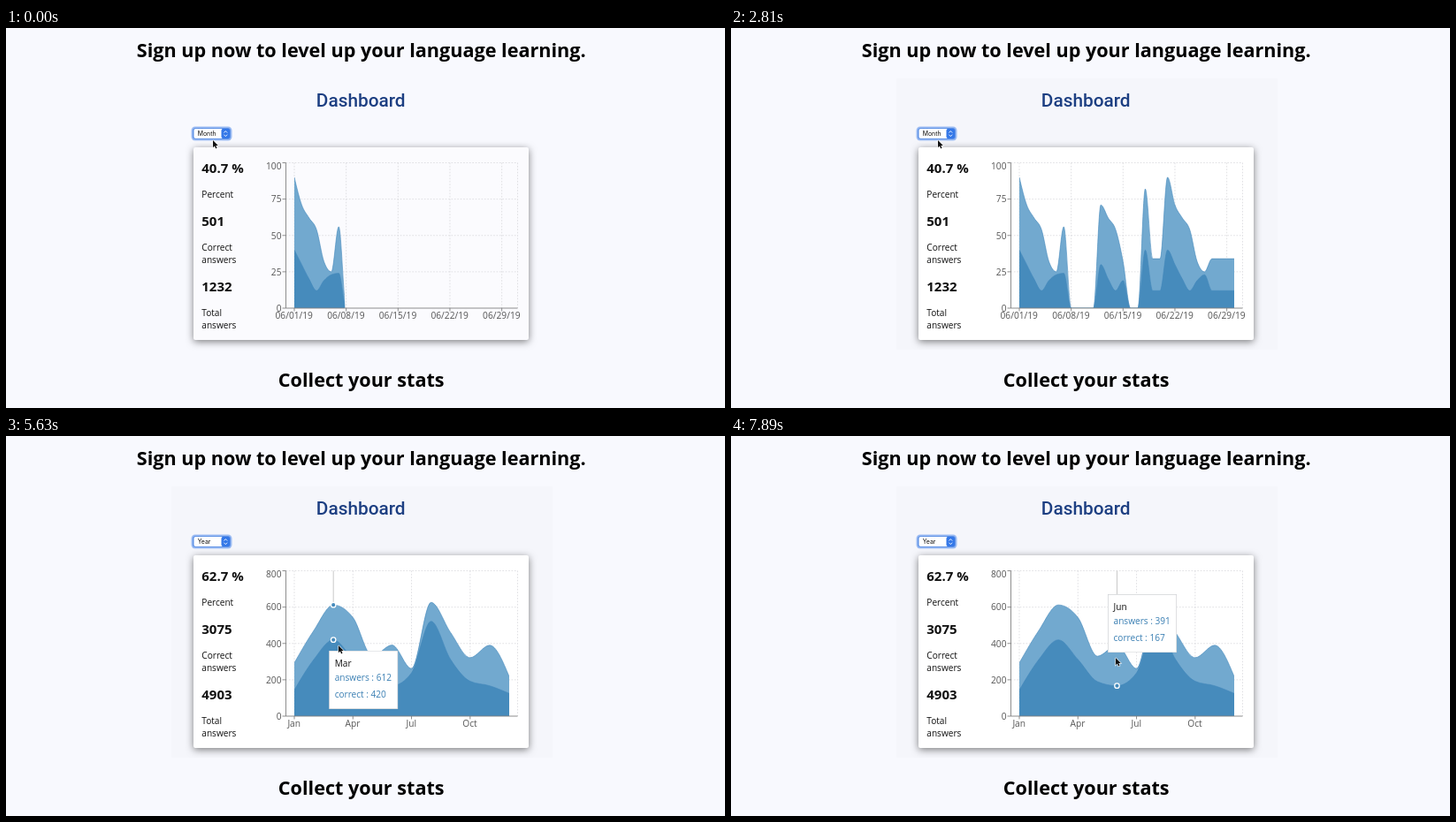
Recreate the animation shown at these times as an HTML page with a canvas. Size 813 by 430 pixels, loop 8000 ms.

```html
<!DOCTYPE html>
<html lang="en">
<head>
<meta charset="utf-8">
<title>Dashboard</title>
<style>
  html, body { margin: 0; width: 100%; height: 100%; overflow: hidden; background: #f8f9fe; }
  canvas { display: block; }
</style>
</head>
<body>
<canvas id="stage" width="813" height="430" aria-label="Statistics dashboard"></canvas>
<script>
const ctx = document.getElementById('stage').getContext('2d');
const LOOP = 8000, STEPS = 61, STEP = LOOP / STEPS;
const SANS = '"Open Sans", "Noto Sans", sans-serif';
const UI = 'Inter, "Liberation Sans", sans-serif';
const PLOT = { left: 316.5, right: 578.5, top: 152.5, bottom: 317, x0: 326, x1: 569 };
const TIP = { w: 78, h: 66, gap: 6, lag: 400 };
const LIGHT = '#72a9cf', DARK = '#468bbc', LINE = '#4287ba';
const GRID = '#dadade', AXIS = '#808080';

const MENU_OPEN = 1560, MENU_YEAR = 1830, MENU_FADE = 2610, MENU_SHUT = 2740, YEAR_ON = 2880;

// The month is built from one repeating week.
const week = [90, 71, 62, 54, 32, 25], weekCorrect = [40, 30, 20, 12, 19, 23];
const repeat = (n, v) => Array(n).fill(v);
const fillMonth = (w, last, peak, flat) => [...w, last, ...repeat(4, 0), ...w.slice(1, 5),
  0, 0, peak, flat, flat, ...w, ...repeat(4, flat)];

const month = {
  name: 'Month', right: 501, total: 1232, max: 100, start: -260, every: 7,
  ticks: [1, 8, 15, 22, 29].map(d => `06/${String(d).padStart(2, '0')}/19`),
  answers: fillMonth(week, 56, 82, 34),
  correct: fillMonth(weekCorrect, 24, 40, 12)
};
const year = {
  name: 'Year', right: 3075, total: 4903, max: 800, start: 2945, every: 3,
  ticks: ['Jan', 'Apr', 'Jul', 'Oct'],
  answers: [293, 472, 612, 543, 330, 391, 262, 626, 460, 322, 390, 218],
  correct: [143, 312, 420, 312, 190, 167, 238, 522, 312, 192, 167, 125]
};
const MONTHS = ['Jan', 'Feb', 'Mar', 'Apr', 'May', 'Jun'];

// Pointer stops: time, x, y
const PATH = [[0, 234, 127], [360, 234, 119], [1700, 234, 119], [2200, 234, 127],
  [3050, 234, 127], [3803, 315, 229], [5380, 352, 237], [5640, 376, 237],
  [6950, 392, 244], [7082, 405, 244], [7600, 413, 250], [7870, 435, 251]];

const clamp = v => Math.max(0, Math.min(1, v));
const mix = (a, b, p) => a + (b - a) * p;

// The picture refreshes in even steps.
const snap = t => Math.min(STEPS - 1, Math.floor((t + 30) / STEP)) * STEP;

function pointer(t) {
  const next = PATH.findIndex(k => k[0] > t);
  const i = next < 0 ? PATH.length - 1 : Math.max(1, next);
  const a = PATH[i - 1], b = PATH[i], p = clamp((t - a[0]) / (b[0] - a[0]));
  return { x: mix(a[1], b[1], p), y: mix(a[2], b[2], p) };
}

// The tooltip sits below the pointer, or above it when there is no room.
function tipGoal(t) {
  const { x, y } = pointer(t);
  const flip = y > 247;
  return { x: Math.max(x, PLOT.left) + TIP.gap, y: flip ? y - TIP.h - TIP.gap + 1 : y + TIP.gap };
}

// It trails behind its goal: the mean of the recent goals.
function tipPlace(t) {
  const n = 16, sum = { x: 0, y: 0 };
  for (let i = 0; i < n; i++) {
    const goal = tipGoal(t - TIP.lag * (i + .5) / n);
    sum.x += goal.x / n;
    sum.y += goal.y / n;
  }
  return sum;
}

function activeMonth(t) {
  const { x } = pointer(t - 60);
  return x > PLOT.left ? Math.max(0, Math.round((x - PLOT.x0) / stepX(year))) : -1;
}

// cubic-bezier(.25, .1, .25, 1)
function ease(p) {
  const bez = (a, b, u) => 3 * a * u * (1 - u) ** 2 + 3 * b * u * u * (1 - u) + u ** 3;
  let lo = 0, hi = 1;
  for (let i = 0; i < 24; i++) {
    const mid = (lo + hi) / 2;
    if (bez(.25, .25, mid) < p) lo = mid; else hi = mid;
  }
  return bez(.1, 1, lo);
}

function text(str, x, y, size, color = '#111', opt = {}) {
  ctx.font = `${opt.weight || 400} ${size}px ${opt.font || SANS}`;
  ctx.textAlign = opt.align || 'left';
  ctx.fillStyle = color;
  ctx.fillText(str, x, y);
}

function box(x, y, w, h, r, fill) {
  ctx.beginPath();
  ctx.roundRect(x, y, w, h, r);
  ctx.fillStyle = fill;
  ctx.fill();
}

function stroke(points, color, width = 1, dash = []) {
  ctx.beginPath();
  points.forEach(([x, y]) => ctx.lineTo(x, y));
  ctx.strokeStyle = color;
  ctx.lineWidth = width;
  ctx.setLineDash(dash);
  ctx.stroke();
  ctx.setLineDash([]);
}

const stepX = data => (PLOT.x1 - PLOT.x0) / (data.answers.length - 1);
const toX = (data, i) => PLOT.x0 + i * stepX(data);
const toY = (data, v) => mix(PLOT.bottom, PLOT.top, v / data.max);

// Monotone cubic curve through evenly spaced values
function curve(data, values) {
  const h = stepX(data), ys = values.map(v => toY(data, v)), n = ys.length;
  const slope = ys.slice(1).map((y, i) => (y - ys[i]) / h);
  const tan = ys.map((_, i) => {
    if (i === 0 || i === n - 1) return 0;
    const a = slope[i - 1], b = slope[i];
    return (Math.sign(a) + Math.sign(b)) * Math.min(Math.abs(a), Math.abs(b), Math.abs(a + b) / 4);
  });
  tan[0] = (3 * slope[0] - tan[1]) / 2;
  tan[n - 1] = (3 * slope[n - 2] - tan[n - 2]) / 2;
  const path = new Path2D();
  path.moveTo(PLOT.x0, ys[0]);
  for (let i = 1; i < n; i++) {
    const x = toX(data, i);
    path.bezierCurveTo(x - h * 2 / 3, ys[i - 1] + tan[i - 1] * h / 3,
      x - h / 3, ys[i] - tan[i] * h / 3, x, ys[i]);
  }
  return path;
}

function area(data, values, fill) {
  const line = curve(data, values), shape = new Path2D(line);
  shape.lineTo(PLOT.x1, PLOT.bottom);
  shape.lineTo(PLOT.x0, PLOT.bottom);
  ctx.fillStyle = fill;
  ctx.fill(shape);
  ctx.strokeStyle = LINE;
  ctx.lineWidth = .6;
  ctx.stroke(line);
}

function drawPage(fade) {
  ctx.fillStyle = '#f8f9fe';
  ctx.fillRect(0, 0, 813, 430);
  ctx.globalAlpha = fade;
  box(187, 57, 431, 307, 0, '#f5f6fb');
  ctx.globalAlpha = 1;
  const title = { weight: 700, align: 'center' };
  text('Sign up now to level up your language learning.', 401.7, 33, 21.6, '#000', title);
  text('Collect your stats', 401.7, 406, 21.6, '#000', title);
  text('Dashboard', 401.2, 89, 20.8, '#1d3f82', { weight: 500, align: 'center', font: 'Roboto, sans-serif' });

  ctx.save();
  ctx.shadowColor = 'rgba(0,0,0,.5)';
  ctx.shadowBlur = 9;
  ctx.shadowOffsetY = 2;
  box(212, 135, 379, 218, 2, fade < .5 ? '#fbfbfe' : '#fff');
  ctx.restore();
}

function drawStats({ right, total }) {
  const percent = (100 * right / total).toFixed(1) + ' %';
  const rows = [[percent, 164, 'Percent'], [right, 224, 'Correct', 'answers'], [total, 298, 'Total', 'answers']];
  rows.forEach(([value, y, ...labels]) => {
    text(value, 221.3, y, 15, '#111', { weight: 700 });
    labels.forEach((s, i) => text(s, 221.3, y + 28 + i * 14, 10.1));
  });
}

function drawSelect(label) {
  box(209.5, 111.5, 46, 16, 4.5, '#9dbdf3');
  box(211, 113, 43, 13, 3.5, '#5f92e6');
  box(212.5, 114, 33, 11, 2, '#fff');
  box(243.5, 114, 9.5, 11, 2, '#3478e8');
  [-1, 1].forEach(d => {
    const y = 119.6 + d * 1.1;
    stroke([[246.4, y], [248.3, y + d * 1.9], [250.2, y]], '#fff', .9);
  });
  text(label, 216.7, 122.3, 6.9, '#111', { font: UI });
}

function drawMenu(row, alpha) {
  ctx.save();
  ctx.globalAlpha = alpha;
  ctx.shadowColor = 'rgba(0,0,0,.35)';
  ctx.shadowBlur = 5;
  ctx.shadowOffsetY = 1;
  box(205, 100, 49.5, 37, 3, '#666a72');
  ctx.shadowColor = 'transparent';
  box(205, 103.2 + row * 10.3, 49.5, 10.5, 0, '#3b7df0');
  ['Week', 'Month', 'Year'].forEach((s, i) =>
    text(s, 218.7, 110.7 + i * 10.3, 6.9, '#fff', { weight: 600, font: UI }));
  stroke([[209.3, 118.9], [211, 121], [214, 116]], '#fff', 1.1);
  ctx.restore();
}

function drawChart(data, t, active) {
  const { left, right, top, bottom, x0, x1 } = PLOT;
  const tickX = data.ticks.map((_, i) => toX(data, i * data.every));
  const rows = [0, 1, 2, 3, 4].map(i => mix(bottom, top, i / 4));

  rows.slice(1).forEach(y => stroke([[left, y], [right, y]], GRID, .8, [1.7, 1.7]));
  [...tickX, right].forEach(x => stroke([[x, top], [x, bottom]], GRID, .8, [1.7, 1.7]));
  if (active >= 0) stroke([[toX(data, active), top], [toX(data, active), bottom]], '#c8c8c8');

  const shown = ease(clamp((t - data.start) / 1500));
  ctx.save();
  ctx.beginPath();
  ctx.rect(x0, top, shown * (x1 - x0), bottom - top);
  ctx.clip();
  area(data, data.answers, LIGHT);
  area(data, data.correct, DARK);
  ctx.restore();

  stroke([[left, top], [left, bottom], [right, bottom]], AXIS, .9);
  rows.forEach((y, i) => {
    stroke([[left - 4, y], [left, y]], AXIS, .9);
    text(data.max / 4 * i, 311.5, y + (i === 4 ? 7 : 3.8), 10.2, '#555', { align: 'right' });
  });
  data.ticks.forEach((s, i) => {
    stroke([[tickX[i], bottom], [tickX[i], bottom + 3.5]], AXIS, .9);
    text(s, tickX[i] - .3, 328.7, 10.2, '#555', { align: 'center' });
  });

  if (active < 0) return;
  [data.answers, data.correct].forEach(values => {
    ctx.beginPath();
    ctx.arc(toX(data, active), toY(data, values[active]), 2.7, 0, 7);
    ctx.fillStyle = DARK;
    ctx.fill();
    ctx.strokeStyle = '#fff';
    ctx.lineWidth = 1.3;
    ctx.stroke();
  });
}

function drawTooltip({ x, y }, active) {
  box(x, y, TIP.w, TIP.h, 0, '#d0d2d5');
  box(x + .7, y + .7, TIP.w - 1.4, TIP.h - 1.4, 0, '#fff');
  text(MONTHS[active], x + 6.5, y + 17.8, 10.1);
  text('answers : ' + year.answers[active], x + 6.5, y + 34, 10.1, '#3a7fb3');
  text('correct : ' + year.correct[active], x + 6.5, y + 53, 10.1, '#3a7fb3');
}

function drawPointer({ x, y }) {
  const shape = [[0, 0], [0, 8.2], [1.9, 6.5], [3.2, 9.4], [4.5, 8.8], [3.3, 6], [5.8, 6], [0, 0]];
  stroke(shape.map(([dx, dy]) => [x + dx, y + dy]), 'rgba(255,255,255,.8)', 1.4);
  ctx.fillStyle = '#111';
  ctx.fill();
}

function draw(t) {
  const data = t < YEAR_ON ? month : year;
  const active = activeMonth(t);
  drawPage(clamp((t - 120) / 900));
  drawStats(data);
  drawChart(data, t, active);
  drawSelect(data.name);
  if (t >= MENU_OPEN && t < MENU_SHUT) drawMenu(t < MENU_YEAR ? 1 : 2, t < MENU_FADE ? 1 : .5);
  if (active >= 0) drawTooltip(tipPlace(t), active);
  drawPointer(pointer(t));
}

const begin = performance.now();
function loop() {
  draw(snap((performance.now() - begin) % LOOP));
  requestAnimationFrame(loop);
}
loop();
</script>
</body>
</html>
```
